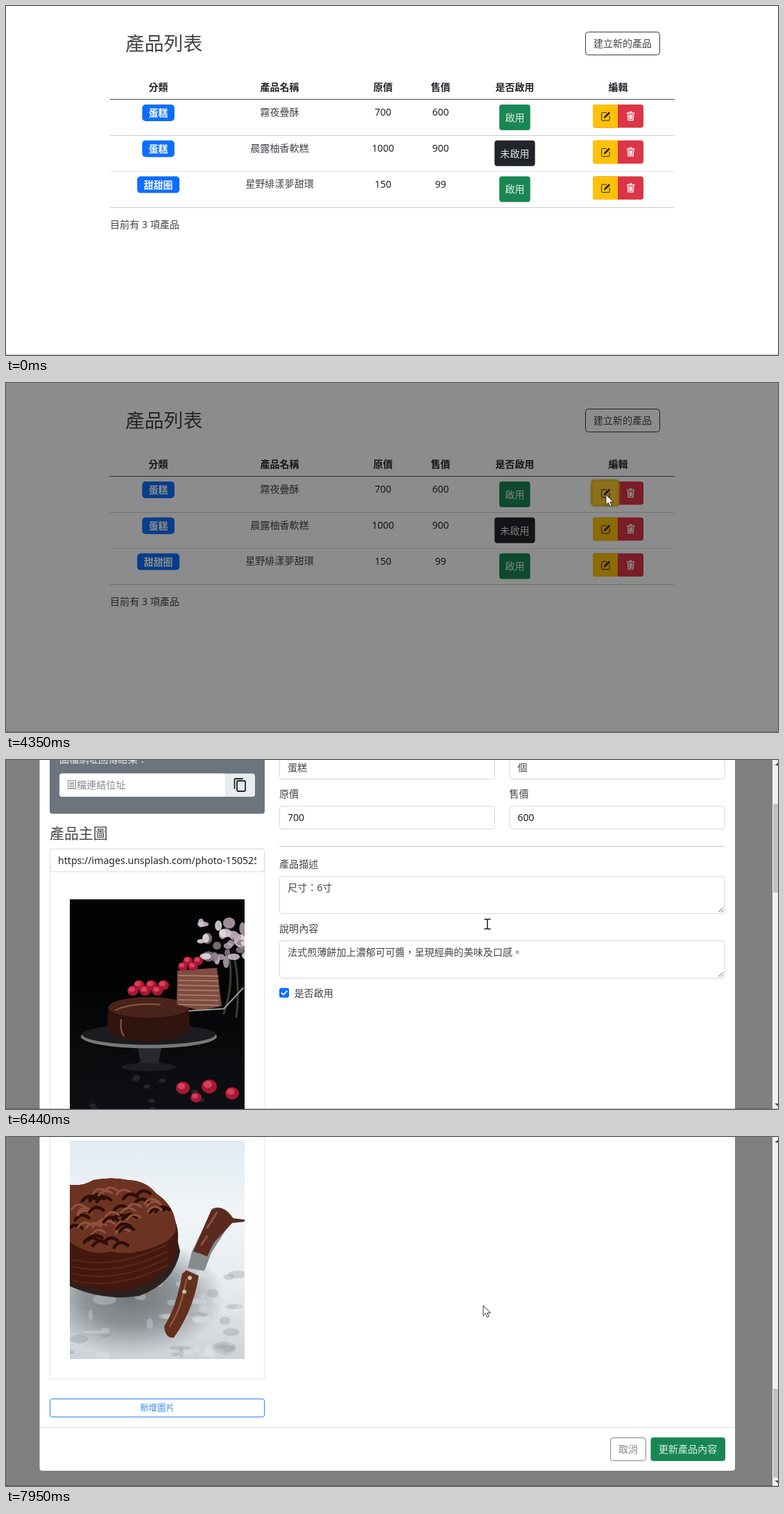
An HTML page that plays this animation: 1113 px wide and 503 px high, repeating every 8 s.

```html
<!DOCTYPE html>
<html lang="zh-Hant">
<head>
<meta charset="utf-8">
<title>產品列表</title>
<style>
html, body { margin: 0; width: 100%; height: 100%; overflow: hidden; background: #fff; }
svg { display: block; }
text { font-family: "Noto Sans", "Noto Sans CJK TC", "Noto Sans CJK", sans-serif; white-space: pre; }
</style>
</head>
<body>
<svg id="stage" width="1113" height="503" viewBox="0 0 1113 503"></svg>
<script>
const INK = '#212529', BLUE = '#0d6efd', GREEN = '#198754', RED = '#dc3545', GRAY = '#6c757d', EDGE = '#ced4da';
const URL_TEXT = 'https://images.unsplash.com/photo-1505253';

function seeded(seed) {
  return () => (seed = (seed * 16807) % 2147483647) / 2147483647;
}

// y is the vertical centre of the line; light text is thinned by opacity
function text(x, y, str, { size = 14.1, fill = INK, weight, anchor = 'start' } = {}) {
  const w = weight || (/^[\x00-\x7f]+$/.test(str) ? 400 : 300);
  return `<text x="${x}" y="${y + size * 0.37}" font-size="${size}" font-weight="${w}" fill="${fill}" fill-opacity="${w < 400 ? .85 : 1}" text-anchor="${anchor}">${str}</text>`;
}
const mid = (x, y, str, opt) => text(x, y, str, { ...opt, anchor: 'middle' });

function box(x, y, x2, y2, fill, r = 4, extra = '') {
  return `<rect x="${x}" y="${y}" width="${x2 - x}" height="${y2 - y}" rx="${r}" fill="${fill}" ${extra}/>`;
}
const frame = (x, y, x2, y2, stroke = EDGE, r = 4) =>
  box(x + .5, y + .5, x2 - .5, y2 - .5, '#fff', r, `stroke="${stroke}" stroke-width=".9"`);
const line = (x, x2, y, color) => `<path d="M${x} ${y + .5}H${x2}" stroke="${color}"/>`;
const ellipse = (x, y, rx, ry, fill, extra = '') =>
  `<ellipse cx="${x}" cy="${y}" rx="${rx}" ry="${ry}" fill="${fill}" ${extra}/>`;
const shape = (d, fill) => `<path d="${d}" fill="${fill}"/>`;
const stroke = (d, color, width = 1) =>
  `<path d="${d}" fill="none" stroke="${color}" stroke-width="${width}" stroke-linecap="round" stroke-linejoin="round"/>`;
const at = (x, y, body, scale = 1) => `<g transform="translate(${x} ${y}) scale(${scale})">${body}</g>`;
const crop = (x, y, w, h, body) => `<svg x="${x}" y="${y}" width="${w}" height="${h}">${body}</svg>`;

const pencil = (x, y) => at(x - 7, y - 7,
  stroke('M14.2 7.5v6a1.2 1.2 0 0 1-1.2 1.2H2.5a1.2 1.2 0 0 1-1.2-1.2V3a1.2 1.2 0 0 1 1.2-1.2H9', INK, 1.1) +
  shape('M4.8 11.2l.9-3.1L13.1.7l2.2 2.2-7.4 7.4z', INK), .885);
const trash = (x, y) => at(x - 7, y - 7,
  stroke('M2 3.2H14M6 2.6V1.2h4v1.4M3.2 3.6l.8 11.2h8l.8-11.2M6 5.8l.3 6.6M8 5.8v6.6M10 5.8l-.3 6.6', '#fff', 1.5), .885);

function row(y, [kind, name, price, sale, on], i) {
  const b = kind.length > 2 ? 30.5 : 23.3, s = on ? 22.3 : 29.2;
  return `<rect id="row${i}" x="149.5" y="${y - 7}" width="814.5" height="51" fill="#ececec"/>` +
    box(219.6 - b, y, 219.6 + b, y + 24, BLUE, 5) +
    mid(219.6, y + 12, kind, { fill: '#fff', weight: 700, size: 13.9 }) +
    mid(394.5, y + 10.5, name) + mid(543.5, y + 11, price) + mid(626.5, y + 11, sale) +
    box(733.5 - s, y, 733.5 + s, y + 37, on ? GREEN : INK) +
    mid(733.5, y + 18.5, on ? '啟用' : '未啟用', { fill: '#fff' }) +
    box(846, y, 919, y + 33.5, RED) +
    shape(`M882 ${y}h-32a4 4 0 0 0-4 4v25.5a4 4 0 0 0 4 4h32z`, '#ffc107') +
    (i ? '' : `<g id="ring">${box(844, y - 2, 884, y + 35, '#ffca2c', 5, 'stroke="#d9a406" stroke-opacity=".5" stroke-width="3.6"')}</g>`) +
    pencil(864.5, y + 17) + trash(900.5, y + 16.5);
}

function listPage() {
  const heads = [[219.5, '分類'], [394.5, '產品名稱'], [543.5, '原價'], [626.5, '售價'], [733.5, '是否啟用'], [882.5, '編輯']];
  const items = [
    ['蛋糕', '霧夜疊酥', '700', '600', true],
    ['蛋糕', '晨露柚香軟糕', '1000', '900', false],
    ['甜甜圈', '星野緋漾夢甜環', '150', '99', true]
  ];
  return box(0, 0, 1113, 503, '#fff', 0) +
    text(172, 54, '產品列表', { size: 27.8 }) +
    frame(835, 37, 943, 71, INK) + mid(889, 54, '建立新的產品', { size: 14 }) +
    heads.map(([x, s]) => mid(x, 116.5, s, { weight: 600, size: 14 })).join('') +
    items.map((it, i) => row(142 + i * 51.8, it, i)).join('') +
    line(149.5, 964, 134, '#4d5154') + line(149.5, 964, 186, '#c8cbce') +
    line(149.5, 964, 238, '#dee2e6') + line(149.5, 964, 290, '#c8cbce') +
    text(150, 315, '目前有 <tspan font-weight="400">3</tspan> 項產品');
}

function berry(x, y, r = 8) {
  return ellipse(x, y, r, r * .9, '#a81835') + ellipse(x - r * .2, y - r * .25, r * .55, r * .45, '#d8405a');
}
const berries = (x, y, n, w, r) =>
  Array.from({ length: n }, (_, i) => berry(x + (i / (n - 1) - .5) * w, y - (i % 2 ? 8 : 0), r)).join('');

function slicePhoto() {
  const rnd = seeded(11);
  let s = box(0, 0, 252, 378, 'url(#night)', 0);
  s += stroke('M222 165Q238 120 228 70M240 170Q246 120 236 80', '#34412f', 3);
  for (let i = 0; i < 34; i++) {
    s += ellipse(222 + (rnd() - .5) * 66, 64 + (rnd() - .5) * 62, 4 + rnd() * 5, 3 + rnd() * 6,
      ['#e6dde2', '#b9a3b2', '#d5c4cf', '#8d7a87'][i % 4], 'opacity=".85"');
  }
  s += shape('M98 215h34l-4 20 26 8H74l28-8z', '#28292c') + ellipse(114, 242, 40, 6, '#1c1d20') +
    ellipse(114, 198, 98, 17, '#77787c') + ellipse(114, 195, 96, 15, '#1c1c20') +
    shape('M55 158Q58 142 114 142T172 158L173 188Q160 205 114 205T54 188z', '#30150f') +
    ellipse(114, 156, 58, 15, '#4a241a') + stroke('M66 160Q90 149 130 152M74 174Q72 190 78 197', '#86594a', 2) +
    berries(113, 132, 6, 44, 8) +
    shape('M155 103L212 99 219 154 187 161 154 151z', '#7d4d40');
  for (let y = 110; y < 154; y += 7) s += stroke(`M157 ${y}L214 ${y + 1}`, '#b88877', 1.4);
  s += stroke('M172 161L222 158 250 128', '#9b9797', 2) + berries(174, 97, 4, 22, 7);
  for (let i = 0; i < 12; i++) s += ellipse(10 + rnd() * 220, 240 + rnd() * 100, 5, 3, '#292529');
  return s + berry(163, 272, 10) + berry(201, 270, 11) + berry(182, 286, 8) + berry(234, 280, 10) + berry(120, 330, 10);
}

function creamPhoto() {
  const rnd = seeded(29);
  let s = box(0, 0, 252, 315, 'url(#cream)', 0) +
    shape('M0 0H178Q186 40 120 66T44 108 0 150z', 'url(#gloss)');
  // fine streaks that follow the strokes of the knife
  for (let i = 0; i < 26; i++) {
    const o = i * 6, c = ['#7c3513', '#bf6c3e', '#94461d'][i % 3];
    s += stroke(`M${44 + o / 2} ${230 + o / 3}Q${30 + o * .6} ${150 + o * .7} ${110 + o * .5} ${112 + o}T252 ${84 + o * 1.2}`, c, 1 + rnd());
    if (i < 16) s += stroke(`M0 ${20 + o}Q50 ${10 + o * .8} 90 ${14 + o * .5}T182 ${o * .4}`, ['#f3d3c0', '#b4683f', '#dba383'][i % 3], 1 + rnd() * 2);
  }
  [['M0 148Q40 100 74 86T172 46Q184 34 176 16', '#6b2c0f', 6], ['M0 142Q40 94 74 80T170 42', '#e9b797', 3],
   ['M252 92Q150 84 108 116T48 160 46 222', '#5f260c', 6], ['M252 86Q150 78 104 110T43 156 41 214', '#cf8357', 3],
   ['M76 166Q84 196 100 192T104 150', '#6b2c0e', 5], ['M80 168Q86 188 94 184', '#d59a76', 4],
   ['M46 218Q84 236 74 262M92 240Q140 196 172 262T184 310', '#5a230a', 6],
   ['M50 212Q92 232 80 264M92 232Q144 190 178 264T192 306', '#bd7045', 3],
   ['M0 210Q50 226 70 312', '#6a2b0e', 5]
  ].forEach(([d, c, w]) => s += stroke(d, c, w));
  const flakes = [[172, 36], [242, 74], [80, 72], [123, 111], [129, 120], [98, 138], [96, 159], [172, 162], [155, 159],
    [239, 167], [141, 186], [165, 194], [176, 195], [201, 223], [221, 237], [230, 258], [198, 132], [32, 205],
    [105, 221], [53, 244], [70, 270], [33, 294], [178, 292], [20, 180]];
  flakes.forEach(([x, y]) => s += at(x, y,
    `<rect x="-4" y="-3.5" width="${7 + rnd() * 3}" height="7" rx="3" fill="#e8bda7" transform="rotate(${rnd() * 90})"/>`));
  return s;
}

function spatulaPhoto() {
  const rnd = seeded(7);
  let s = box(0, 0, 252, 315, 'url(#stone)', 0) + ellipse(88, 225, 135, 85, 'url(#shadow)');
  for (let i = 0; i < 60; i++) {
    s += ellipse(rnd() * 252, 190 + rnd() * 125, 3 + rnd() * 14, 2 + rnd() * 6, i % 3 ? '#e6eaed' : '#878d91', 'opacity=".3"');
  }
  s += shape('M0 210Q50 232 100 224 150 206 159 160L150 120 0 190z', '#2b211e') +
    shape('M0 64Q20 66 34 57 60 52 84 57 110 58 124 76 148 92 152 116 162 140 148 176 126 204 92 214 50 224 0 204z', '#43190f') +
    shape('M0 64Q20 66 34 57 60 52 84 57 110 58 124 76 148 92 152 116 158 138 130 150 90 168 60 160 30 168 0 146z', '#6d3322');
  for (let i = 0; i < 46; i++) {
    const a = rnd() * 6.28, q = Math.sqrt(rnd());
    const x = 68 + Math.cos(a) * q * 70, y = 110 + Math.sin(a) * q * 42;
    s += stroke(`M${x - 11} ${y + 4}q8 -12 20 -3`, i % 2 ? '#2d0f09' : '#93533e', i % 2 ? 4.5 : 3);
  }
  for (let y = 172; y < 212; y += 10) s += stroke(`M4 ${y}Q70 ${y + 14} 140 ${y - 22}`, '#5a2618', 2);
  return s + shape('M176 160L206 98Q222 92 236 112L204 162 194 188 170 184z', '#878b8c') +
    shape('M178 160L204 100Q220 90 235 112L252 114v3l-18 2-26 28-10 20-10-4z', '#5a2a1e') +
    stroke('M198 126L212 104M190 150l8 -12', '#8d5140', 3) +
    shape('M168 187L186 195Q178 245 150 284 138 286 136 268 154 240 162 192z', '#63301f') +
    stroke('M168 200Q160 245 144 268', '#9a5f45', 2) + ellipse(173, 198, 3, 3, '#c8bcae') + ellipse(165, 218, 3, 3, '#c8bcae');
}

function photoCard(y, h, art, removable) {
  return frame(63, y + 30, 373, y + 73 + h + 29, '#e3e5e7', 0) + frame(63, y, 373, y + 34) +
    crop(64, y + 1, (removable ? 324.5 : 361) - 64, 32, text(11, 16, URL_TEXT)) +
    (removable ? box(335, y, 373, y + 34, RED) + box(335, y, 341, y + 34, RED, 0) + trash(353.7, y + 16.5) : '') +
    crop(92, y + 73, 252, h, art);
}

function field(x, x2, y, label, value, area) {
  const bottom = y + (area ? 55 : 34);
  return text(x, y - 17, label) + frame(x, y, x2, bottom) + text(x + 12, y + 17.2, value) +
    (area ? stroke(`M${x2 - 9} ${bottom - 3}l6 -6M${x2 - 5} ${bottom - 3}l2 -2`, '#555') : '');
}

function editForm() {
  const white = { fill: '#fff' };
  return box(48.5, 0, 1051, 1835, '#fff') + box(48.5, 0, 1051, 55.5, INK) + box(48.5, 10, 1051, 55.5, INK, 0) +
    text(63, 28, '新增產品', { size: 17.4, fill: '#fff', weight: 400 }) +
    stroke('M1024 22l12 12M1036 22l-12 12', '#000', 1.6) +
    box(63, 70, 373, 253.5, GRAY) + text(77, 97, '圖檔上傳區', { ...white, size: 20.9 }) +
    box(77, 120.5, 359, 153.5, '#fff') + box(77, 120.5, 155, 153.5, '#e9ecef') +
    box(150, 120.5, 155.5, 153.5, '#e9ecef', 0) +
    text(88, 137, '選擇檔案') + text(167, 137, '未選擇任何檔案') +
    text(77, 175, '圖檔網址回傳結果：', white) +
    box(77, 195.5, 359, 229, '#e9ecef') + box(77, 195.5, 316, 229, '#fff') +
    text(88, 212, '圖檔連結位址', { fill: GRAY }) +
    `<rect x="333" y="206" width="12" height="15" rx="1.5" fill="none" stroke="${INK}" stroke-width="1.8"/>` +
    stroke('M329.5 217V204.5a1.5 1.5 0 0 1 1.5 -1.5H341', INK, 1.8) +
    text(63, 281, '產品主圖', { size: 20.9 }) + photoCard(303.5, 378, slicePhoto()) +
    text(63, 817, '其他圖片', { size: 20.9 }) +
    photoCard(840, 315, creamPhoto(), true) + photoCard(1286, 315, spatulaPhoto(), true) +
    frame(63, 1731, 373, 1758, BLUE, 3) + mid(218, 1744.3, '新增圖片', { size: 12.4, fill: BLUE }) +
    field(394, 1036.5, 98, '標題', '霧夜疊酥') +
    field(394, 705, 170, '分類', '蛋糕') + field(725.5, 1036.5, 170, '單位', '個') +
    field(394, 705, 242, '原價', '700') + field(725.5, 1036.5, 242, '售價', '600') +
    line(394, 1036.5, 300, '#c8c9ca') +
    field(394, 1036.5, 343, '產品描述', '尺寸：<tspan font-weight="400">6</tspan>寸', true) +
    field(394, 1036.5, 436, '說明內容', '法式煎薄餅加上濃郁可可醬，呈現經典的美味及口感。', true) +
    box(394, 504.5, 408, 518.5, BLUE, 3) + stroke('M397.5 511.8l2.6 2.6 4.8 -5.2', '#fff', 1.8) +
    text(415.5, 511.5, '是否啟用') +
    line(49, 1051, 1772, '#dee2e6') +
    frame(871, 1787, 923, 1821, GRAY) + mid(897, 1804, '取消', { fill: GRAY }) +
    box(929.5, 1787, 1037, 1821, GREEN) + mid(983, 1804, '更新產品內容', white);
}

const stops = colors => colors.map((c, i) => `<stop offset="${i / (colors.length - 1)}" stop-color="${c}"/>`).join('');
const gradient = (id, x2, ...colors) => `<linearGradient id="${id}" x2="${x2}" y2="1">${stops(colors)}</linearGradient>`;

const defs = gradient('cream', .6, '#c98a63', '#ab5a2b', '#95471b', '#7c3611') +
  gradient('gloss', .8, '#ecc8b3', '#dca587', '#b0663a') +
  gradient('night', 0, '#030304', '#030304', '#0c0d10', '#111216') +
  gradient('stone', 0, '#e2ebf1', '#f1f5f7', '#e6ebee', '#ccd2d6') +
  `<radialGradient id="shadow">${stops(['#70767a', '#8d9397', '#8d939700'])}</radialGradient>`;

const cursors = {
  arrow: '<path d="M0 0V14.5L3.4 11.4 5.8 16.8 8.2 15.8 5.9 10.6H10.6Z" fill="#fff" stroke="#222" stroke-width=".9"/>',
  hand: '<path d="M-1.6 .8Q0-.8 1.5 .8V7Q3.2 5.8 4.2 7.4 6 6.4 6.8 8.2 8.6 7.6 8.8 9.6V13L7 19H-2L-6.4 12Q-6.6 9.4-3.8 10.6L-1.6 12.4Z" fill="#fff" stroke="#222" stroke-width=".9"/>',
  beam: stroke('M-4 -7H-1L0 -6 1 -7H4M0 -6V6M-4 7H-1L0 6 1 7H4', '#111', 1.4)
};

document.getElementById('stage').innerHTML = `<defs>${defs}</defs>` +
  listPage() + '<rect id="shade" width="1113" height="503"/>' +
  `<g id="modal"><g id="sheet">${editForm()}</g></g>` +
  `<g id="bar">${box(1105, 0, 1113, 503, '#f1f1f1', 0)}${shape('M1108.5 8l4-4 4 4z', '#505050')}${shape('M1108.5 495l4 4 4-4z', '#505050')}` +
  '<rect id="thumb" x="1106" width="7" height="128" fill="#c1c1c4"/></g>' +
  '<path d="M0 502.5H1113" stroke="#000" stroke-opacity=".22"/>' +
  `<g id="cursor">${Object.entries(cursors).map(([k, d]) => `<g id="${k}">${d}</g>`).join('')}</g>`;

const el = id => document.getElementById(id);
const show = (id, on) => { el(id).style.display = on ? '' : 'none'; };
const move = (id, x, y) => el(id).setAttribute('transform', `translate(${x} ${y})`);
const clamp = v => Math.min(1, Math.max(0, v));
const linear = p => p, smooth = p => p * p * (3 - 2 * p), easeOut = p => 1 - (1 - p) ** 2.2;

// keys: [ms, ...values]
function track(t, keys, ease) {
  const i = keys.findIndex(k => k[0] > t);
  if (i === 0) return keys[0].slice(1);
  if (i < 0) return keys[keys.length - 1].slice(1);
  const a = keys[i - 1], b = keys[i], p = ease((t - a[0]) / (b[0] - a[0]));
  return a.slice(1).map((v, j) => v + (b[j + 1] - v) * p);
}

const path = [
  [360, 1052, 490], [1120, 738, 216], [1200, 738, 216], [1270, 736, 264], [1610, 736, 264],
  [1860, 736, 112], [2720, 736, 112], [2920, 739, 246], [3000, 741, 222], [3390, 741, 222],
  [3400, 742.5, 216], [4140, 865, 161], [5100, 865, 161], [5310, 692, 235.5], [7700, 692, 235.5], [7900, 688, 243]
];
const scroll = [
  [5559, 0], [5560, 25], [5710, 89.5], [5909, 89.5], [5910, 105], [6110, 179], [6439, 179], [6440, 201],
  [7070, 895], [7259, 895], [7260, 915], [7320, 952], [7890, 1379]
];

function render(t) {
  const [x, y] = track(t, path, smooth), s = Math.round(track(t, scroll, linear)[0]);
  const clicked = t >= 4210, open = t >= 4400;
  const over = !clicked && t >= 360 && x > 149 && x < 964 ? Math.floor((y - 134.5) / 51.8) : -1;
  for (let i = 0; i < 3; i++) show('row' + i, over === i);
  show('ring', clicked);
  el('shade').style.opacity = .5 * clamp((t - 4215) / 150);

  show('modal', open);
  show('bar', open);
  el('modal').style.opacity = clamp((t - 4400) / 150);
  move('modal', 0, -50 * (1 - easeOut(clamp((t - 4400) / 330))));
  move('sheet', 0, 25 - s);
  move('thumb', 0, 12 + s * .2545);

  const onButton = over >= 0 && ((x > 704 && x < 763) || (x > 846 && x < 919));
  const typing = t > 5980 && t < 6540;
  show('cursor', t >= 360);
  show('hand', onButton);
  show('beam', typing);
  show('arrow', !onButton && !typing);
  move('cursor', typing ? x + 2 : x, typing ? y + 1 : y);
}

let start;
function tick(now) {
  start ??= now;
  render((now - start) % 8000);
  requestAnimationFrame(tick);
}
render(0);
requestAnimationFrame(tick);
</script>
</body>
</html>
```
